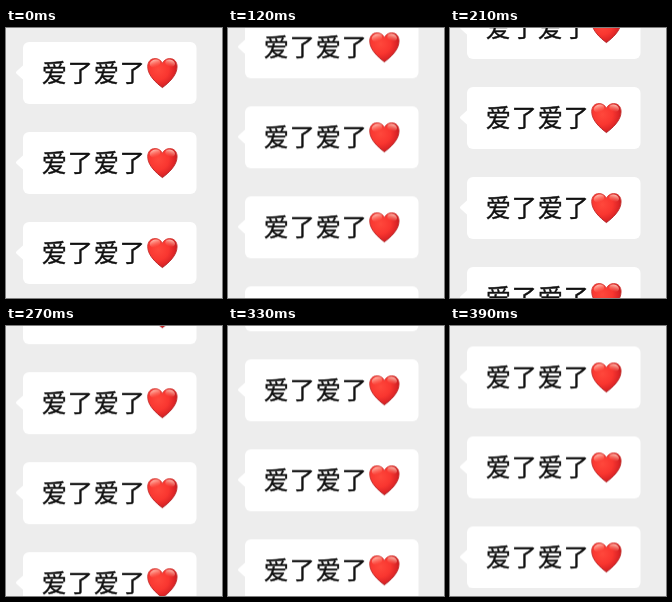
An HTML page for the animation above (0.42 s loop, 216 by 270 pixels).

```html
<!DOCTYPE html>
<html lang="zh-CN">
<head>
<meta charset="utf-8">
<title>爱了爱了</title>
<style>
  html, body { margin: 0; width: 100%; height: 100%; overflow: hidden; background: #ededed; }
  svg { display: block; width: 100vw; height: 100vh; }
  text {
    font: 400 25.2px "Noto Sans CJK SC", "Noto Sans CJK", sans-serif;
    letter-spacing: 0.8px;
    fill: #111;
    stroke: #111;
    stroke-width: 0.35px;
  }
</style>
</head>
<body>
<svg viewBox="0 0 216 270">
  <defs>
    <radialGradient id="red" cx="0.36" cy="0.38" r="0.7">
      <stop offset="0" stop-color="#ff483c"/>
      <stop offset="0.5" stop-color="#f93630"/>
      <stop offset="0.8" stop-color="#dc2426"/>
      <stop offset="1" stop-color="#b2181c"/>
    </radialGradient>
    <linearGradient id="rim" x1="0" y1="0" x2="0" y2="1">
      <stop offset="0" stop-color="#d8453f"/>
      <stop offset="1" stop-color="#a8181c"/>
    </linearGradient>
    <linearGradient id="shine" x1="0" y1="0" x2="0" y2="1">
      <stop offset="0" stop-color="#ffc4b6" stop-opacity="0.95"/>
      <stop offset="1" stop-color="#ff8472" stop-opacity="0"/>
    </linearGradient>
    <g id="heart">
      <path fill="url(#red)" stroke="url(#rim)" stroke-width="0.9"
        d="M0 -9.6C-1.6 -12.8 -4.3 -14.3 -7.4 -14.3C-11.9 -14.3 -14.7 -10.8 -14.7 -6.1C-14.7 2.8 -5.8 10.4 0 14.8C5.8 10.4 14.7 2.8 14.7 -6.1C14.7 -10.8 11.9 -14.3 7.4 -14.3C4.3 -14.3 1.6 -12.8 0 -9.6Z"/>
      <ellipse cx="-7.4" cy="-9.4" rx="5.4" ry="3.8" fill="url(#shine)" transform="rotate(-18 -7.4 -9.4)"/>
      <ellipse cx="7.7" cy="-9.6" rx="5" ry="3.5" fill="url(#shine)" transform="rotate(16 7.7 -9.6)"/>
    </g>
    <g id="message">
      <rect x="17" width="173.5" height="62" rx="6" fill="#fff"/>
      <path d="M18 22.5L10.6 29.2Q9.4 30.5 10.6 31.8L18 38.5Z" fill="#fff"/>
      <text x="35.7" y="40">爱了爱了</text>
      <use href="#heart" x="156.4" y="30.8"/>
    </g>
  </defs>
  <rect width="216" height="270" fill="#ededed"/>
  <g id="list"></g>
</svg>
<script>
  const PITCH = 90, TOP = 14, STEPS = 14, LOOP = 420;
  const list = document.getElementById('list');

  for (let row = 0; row < 4; row++) {
    const use = document.createElementNS('http://www.w3.org/2000/svg', 'use');
    use.setAttribute('href', '#message');
    use.setAttribute('y', TOP + row * PITCH);
    list.append(use);
  }

  // Scroll up by one message per loop, in even hard steps.
  list.animate(
    { transform: ['translateY(0)', `translateY(${-PITCH}px)`] },
    { duration: LOOP, iterations: Infinity, easing: `steps(${STEPS}, end)` }
  );
</script>
</body>
</html>
```
